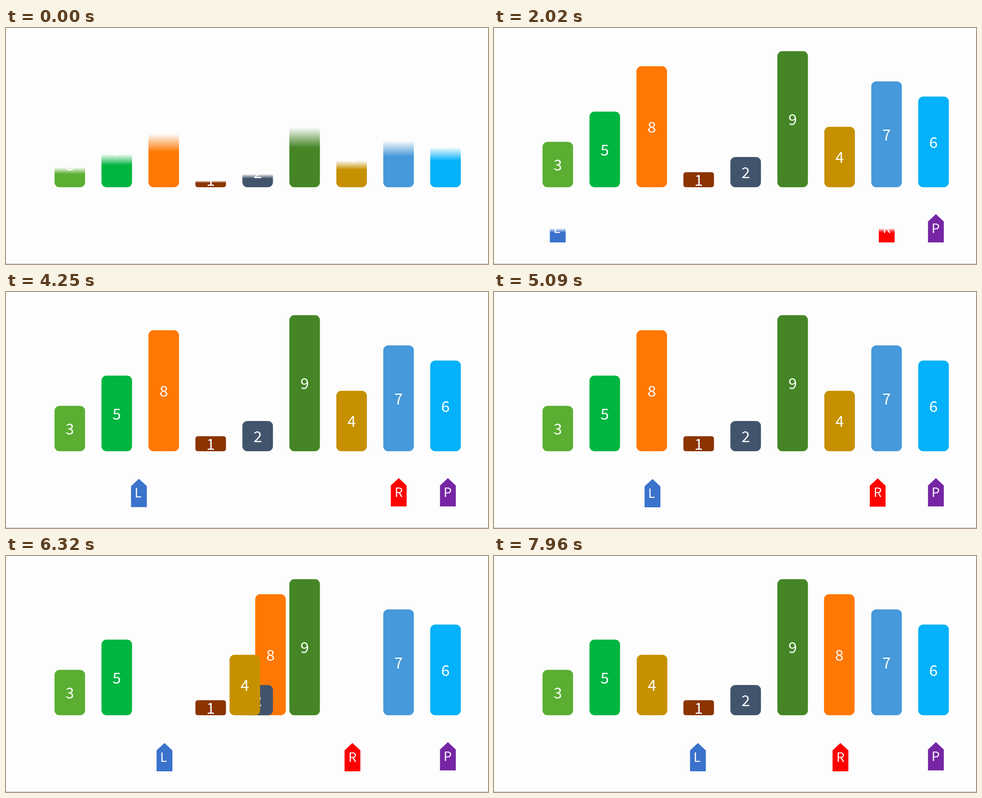
Write an HTML page that moves like this. It is 1066 by 525 pixels and loops after 8000 ms.

```html
<!DOCTYPE html>
<html lang="en">
<head>
<meta charset="utf-8">
<title>Partition step</title>
<style>
  html, body { margin: 0; width: 100%; height: 100%; overflow: hidden; background: #fdfdfd; }
  svg { display: block; width: 1066px; height: 525px; }
  text { fill: #fff; text-anchor: middle; font-family: "Noto Sans CJK SC", "Noto Sans CJK JP", "Noto Sans", sans-serif; font-weight: 300; }
</style>
</head>
<body>
<svg id="stage" viewBox="0 0 1066 525">
  <rect y="524" width="1066" height="1" fill="#bcbcbc"/>
</svg>
<script>
const LOOP = 8000, WIPE = 870, FEATHER = 0.15;
const BASE = 354.3, UNIT = 33.65, BAR_W = 67.6, PITCH = 103.87, LEFT = 107.3;
const stage = document.getElementById('stage');
let count = 0;

function add(parent, tag, attrs, text) {
  const el = document.createElementNS('http://www.w3.org/2000/svg', tag);
  for (const key in attrs) el.setAttribute(key, attrs[key]);
  if (text) el.textContent = text;
  parent.appendChild(el);
  return el;
}

// A group revealed from its bottom edge upwards behind a soft edge.
function wipeGroup(x, top, bottom, w, start) {
  const id = count++;
  const grad = add(stage, 'linearGradient', { id: 'g' + id, gradientUnits: 'userSpaceOnUse', x1: 0, x2: 0 });
  add(grad, 'stop', { offset: 0, 'stop-color': '#fff' });
  add(grad, 'stop', { offset: 1, 'stop-color': '#fff', 'stop-opacity': 0 });
  const box = { x: x - 2, y: top - 2, width: w + 4, height: bottom - top + 4 };
  const mask = add(stage, 'mask', { id: 'm' + id, maskUnits: 'userSpaceOnUse', ...box });
  add(mask, 'rect', { ...box, fill: `url(#g${id})` });
  const g = add(stage, 'g', {});

  function reveal(t) {
    const head = (t - start) / WIPE * (1 + FEATHER);
    const y = part => bottom - part * (bottom - top);
    g.setAttribute('display', head > 0 ? 'inline' : 'none');
    g.setAttribute('mask', head < 1 + FEATHER ? `url(#m${id})` : 'none');
    grad.setAttribute('y1', y(head - FEATHER));
    grad.setAttribute('y2', y(head));
  }
  const move = (dx, dy) => g.setAttribute('transform', `translate(${dx} ${dy})`);
  return { g, reveal, move };
}

function makeBar([value, color], i) {
  const h = value * UNIT, x = LEFT + i * PITCH, top = BASE - h;
  const bar = wipeGroup(x, top, BASE, BAR_W, -333);
  add(bar.g, 'rect', { x, y: top, width: BAR_W, height: h, rx: Math.min(11.2, h / 6), fill: color });
  add(bar.g, 'text', { x: x + BAR_W / 2, y: BASE - h / 2 + 13.4, 'font-size': 34 }, String(value));
  return bar;
}

function makeTag(name, color, cx, shift, start) {
  const w = 35, top = 414, bottom = 477, x = cx - w / 2;
  const tag = wipeGroup(x, top, bottom, w, start);
  add(tag.g, 'path', { d: `M${cx} ${top}l${w / 2} 16.5V${bottom}h${-w}V${top + 16.5}z`, fill: color });
  add(tag.g, 'text', { x: cx + shift, y: 456, 'font-size': 28.5 }, name);
  return tag;
}

const bars = [
  [3, '#5bae32'], [5, '#00b540'], [8, '#ff7804'], [1, '#8b3400'], [2, '#42546b'],
  [9, '#458526'], [4, '#c79000'], [7, '#4699da'], [6, '#02b1f9']
].map(makeBar);
const tagL = makeTag('L', '#3a72cc', 141, -2, 1640);
const tagR = makeTag('R', '#ff0000', 868.5, 0, 1640);
const tagP = makeTag('P', '#7626a4', 977.3, -0.5, 660);
const parts = [...bars, tagL, tagR, tagP];

function ease(t, start, length) {
  const x = Math.min(1, Math.max(0, (t - start) / length));
  const p = 2.15;
  return x < 0.5 ? Math.pow(2 * x, p) / 2 : 1 - Math.pow(2 - 2 * x, p) / 2;
}

function draw(t) {
  parts.forEach(part => part.reveal(t));
  const hop1 = ease(t, 2762, 1000), hop2 = ease(t, 3768, 1000), hop3 = ease(t, 6920, 890);
  tagL.move(104 * hop1 + 105.5 * hop2 + 100.5 * hop3, hop1 + hop2);
  const back = ease(t, 4768, 1000);
  tagR.move(-102.3 * back, 2 * back);
  const swap = ease(t, 5875, 836);
  bars[2].move(414.8 * swap, 0);
  bars[6].move(-414.8 * swap, 0);
}

const begin = performance.now();
function tick() {
  draw((performance.now() - begin) % LOOP);
  requestAnimationFrame(tick);
}
draw(0);
requestAnimationFrame(tick);
</script>
</body>
</html>
```
